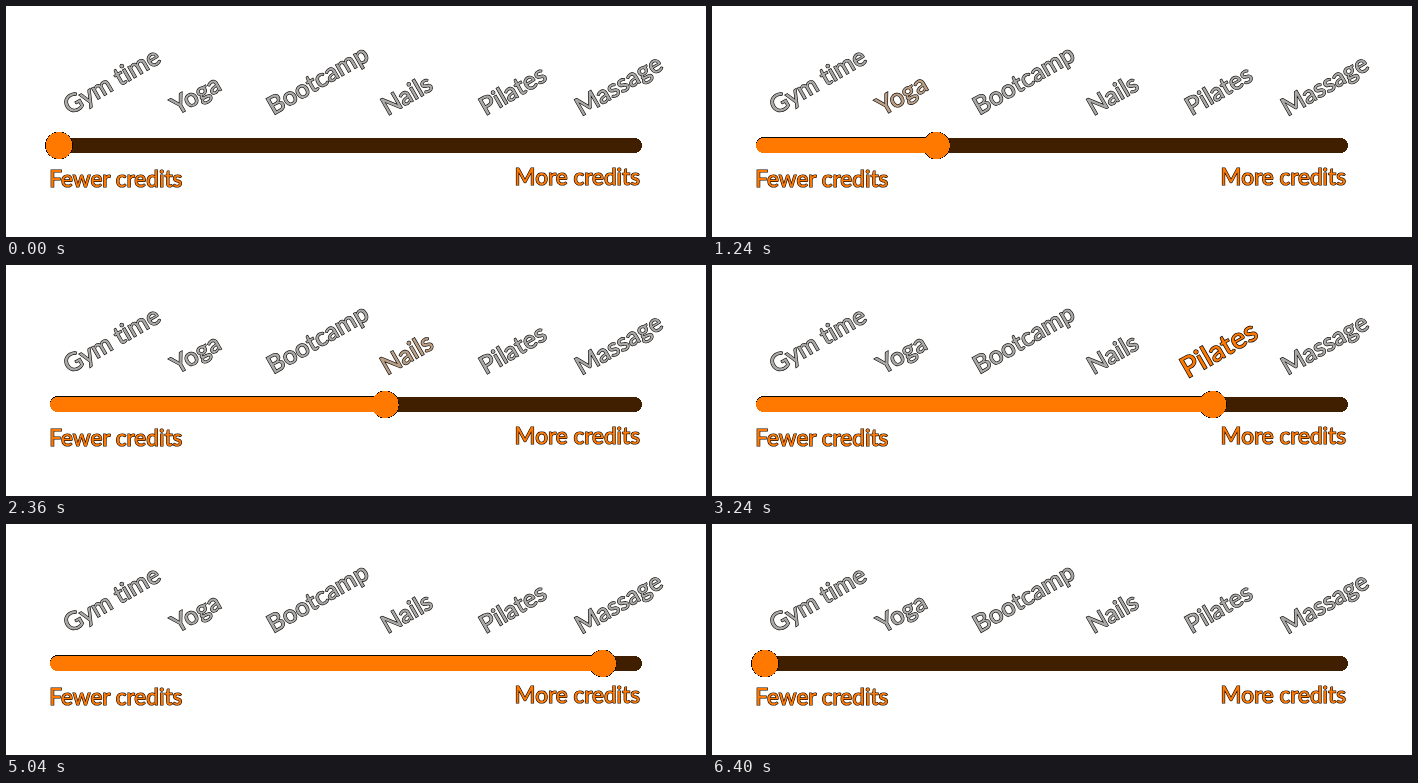
An HTML page for the animation above (7680 ms loop, 700 by 231 pixels).

```html
<!DOCTYPE html>
<html lang="en">
<head>
<meta charset="utf-8">
<title>Credit slider</title>
<style>
  html, body { margin: 0; width: 100%; height: 100%; overflow: hidden; background: #fff; }
  svg { display: block; width: 700px; height: 231px; }
  rect, circle { shape-rendering: crispEdges; }
  text {
    font-family: Lato, "Open Sans", sans-serif;
    font-weight: 500;
    font-variant-ligatures: none;
    paint-order: stroke;
    stroke: #0c0600;
    stroke-width: 1.2;
  }
  #labels text { font-size: 25px; text-anchor: middle; }
  .credits { font-size: 22.5px; fill: #ff7800; }
</style>
</head>
<body>
<svg viewBox="0 0 700 231">
  <g id="labels"></g>
  <rect x="44" y="132" width="592" height="15" rx="7.5" fill="#401f00"/>
  <rect id="edge" class="fill" x="44" y="131" height="15" rx="7.5" fill="#0c0600"/>
  <circle class="knob" cy="139.5" r="13.9" fill="#0c0600"/>
  <rect class="fill" x="44" y="132" height="15" rx="7.5" fill="#ff7800"/>
  <circle class="knob" cy="139.5" r="13.4" fill="#ff7800"/>
  <text class="credits" x="43.3" y="180.5">Fewer credits</text>
  <text class="credits" x="634" y="178.5" text-anchor="end">More credits</text>
</svg>
<script>
const LOOP = 7680, STEP = 40;
const START_X = 53, TRAVEL = 575, BAR_X = 44;
const FORWARD_END = 4160, BACK_START = 4800, BACK_TIME = 1600;
const FIRST_PEAK = 360, PEAK_GAP = 720, RAMP = 200;
const GREY = [169, 169, 169], ORANGE = [255, 120, 0];

// Label text with the left and right edge of its slanted shape
const labels = [
  ["Gym time", 54, 157],
  ["Yoga", 162, 217],
  ["Bootcamp", 258, 365],
  ["Nails", 373, 428],
  ["Pilates", 471, 542],
  ["Massage", 568, 657],
].map(([word, left, right]) => {
  const node = document.createElementNS("http://www.w3.org/2000/svg", "text");
  node.textContent = word;
  node.setAttribute("y", 9);
  document.getElementById("labels").append(node);
  return { node, x: (left + right) / 2, y: 102 - (right - left - 8.7) * 0.2887 };
});
const knobs = document.querySelectorAll(".knob");
const fills = document.querySelectorAll(".fill");
const edge = document.getElementById("edge");

const clamp = v => Math.min(1, Math.max(0, v));
const easeSine = v => (1 - Math.cos(Math.PI * v)) / 2;
const mix = k => `rgb(${GREY.map((c, i) => Math.round(c + (ORANGE[i] - c) * k))})`;

function progress(t) {
  return t < BACK_START
    ? clamp(t / FORWARD_END)
    : 1 - easeSine(clamp((t - BACK_START) / BACK_TIME));
}

function draw(t) {
  const p = progress(t);
  const knobX = START_X + TRAVEL * p;
  knobs.forEach(knob => knob.setAttribute("cx", knobX));
  fills.forEach(fill => fill.setAttribute("width", knobX - BAR_X));
  // The thin upper edge vanishes once the bar is full
  edge.setAttribute("opacity", p < 1 ? 1 : 0);

  labels.forEach(({ node, x, y }, i) => {
    const k = clamp(1 - Math.abs(t - FIRST_PEAK - PEAK_GAP * i) / RAMP);
    node.setAttribute("transform", `translate(${x} ${y}) rotate(-30) scale(${1 + 0.15 * k})`);
    node.setAttribute("fill", mix(k));
  });
}

const begin = performance.now();
function tick() {
  const t = (performance.now() - begin) % LOOP;
  draw(t - t % STEP);
  requestAnimationFrame(tick);
}
tick();
</script>
</body>
</html>
```
